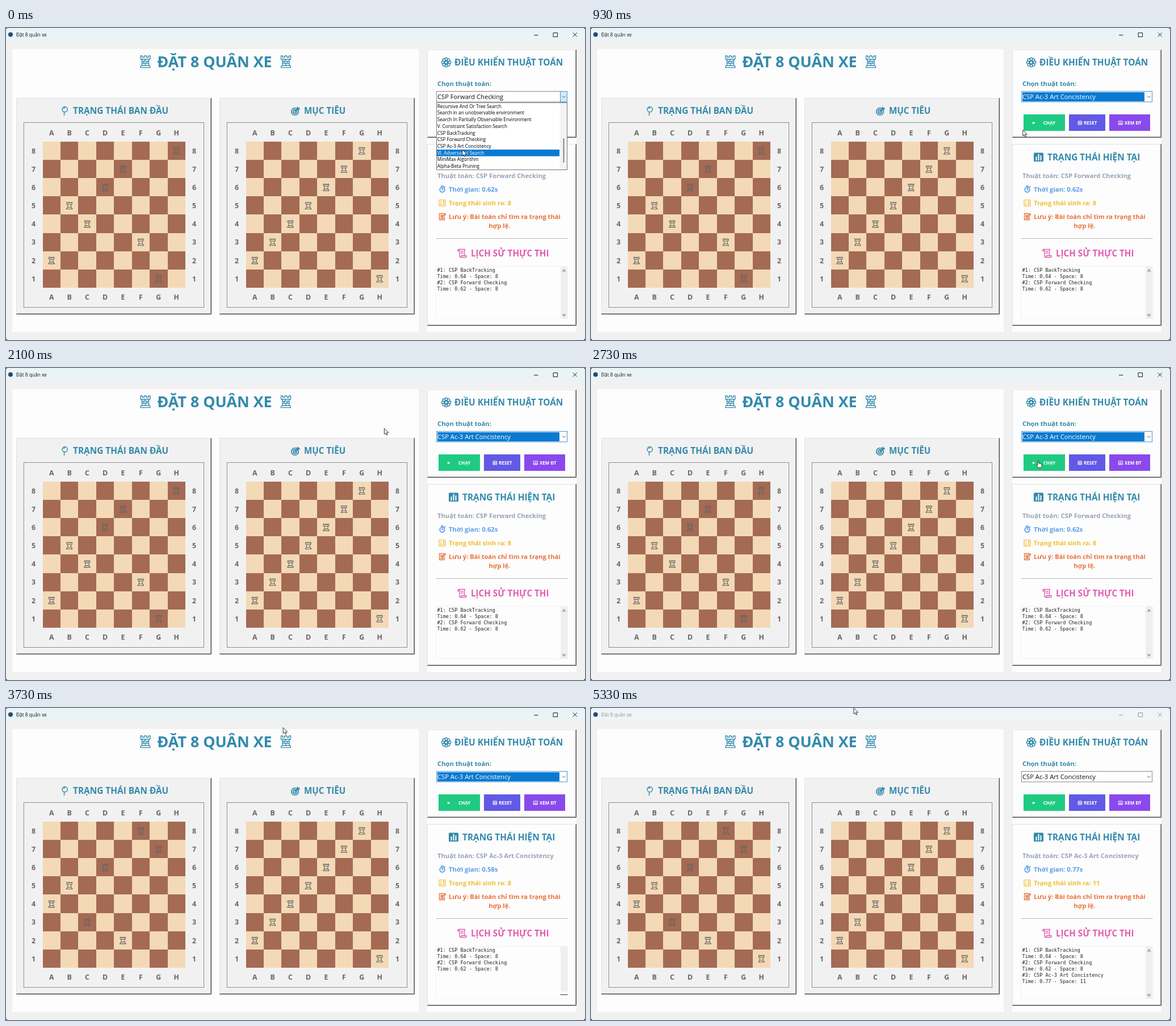
Recreate the animation shown at these times as an HTML page. Size 1020x549 px, loop 5.36 s.

```html
<!DOCTYPE html>
<html lang="vi">
<head>
<meta charset="utf-8">
<title>Đặt 8 quân xe</title>
<style>
html, body { margin: 0; height: 100%; overflow: hidden; background: #222; }
svg { display: block; width: 1020px; height: 549px; }
text { font-family: "Open Sans", "Noto Sans", sans-serif; white-space: pre; }
.b { font-weight: 700; }
.m { font-family: "DejaVu Sans Mono", monospace; }
.o { fill: none; stroke-linejoin: round; stroke-linecap: round; }
</style>
</head>
<body>
<svg id="stage" viewBox="0 0 1020 549"></svg>
<script>
const LOOP = 5360, CLOSE = 800, BLUR = 5050, RUN = 2975, STEP = 95;
const TEAL = '#338aac', BLUE = '#0a7ad1', DARK = '#a46a54', LIGHT = '#f3d9b6';
const CW = 31.43, CH = 32.14, TOP = 199.8;
const NAMES = 'ABCDEFGH';
const FIRST = 'H8 E7 D6 B5 C4 F3 A2 G1', GOAL = 'G8 F7 E6 D5 C4 B3 A2 H1';
const PLACED = 'B5 C3 D6 A4 E2 F8 G7 H1'.split(' ');
const OLD = 'CSP Forward Checking', NEW = 'CSP Ac-3 Art Concistency';
const ITEMS = ['Recursive And Or Tree Search', 'Search in an unobservable environment',
  'Search In Partially Observable Environment', 'V. Constraint Satisfaction Search', 'CSP BackTracking',
  OLD, NEW, 'VI. Adversarial Search', 'MiniMax Algorithm', 'Alpha-Beta Pruning'];
const LIST_Y = 131.8, ROW = 11.73;
// time, x, y of the pointer tip
const PATH = [[0, 804, 214.2], [530, 807, 205], [800, 807, 205], [1400, 429, -4], [1470, 429, -5],
  [1560, 431, -4], [2450, 788, 163], [2880, 788, 163], [3170, 649, 246], [3950, 450, -16],
  [4850, 463, -16], [5000, 463, 0], [LOOP, 463, 0]];

const rect = (x, y, x2, y2, fill, more = '') =>
  `<rect x="${x}" y="${y}" width="${x2 - x}" height="${y2 - y}" fill="${fill}" ${more}/>`;
const text = (x, y, size, fill, s, more = '') =>
  `<text x="${x}" y="${y}" font-size="${size}" fill="${fill}" ${more}>${s}</text>`;
const bold = (x, y, size, fill, s, more = '') => text(x, y, size, fill, s, 'class="b" ' + more);
const line = (d, stroke, w = 1, more = '') =>
  `<path class="o" d="${d}" stroke="${stroke}" stroke-width="${w}" ${more}/>`;
const icon = (x, y, color, d, w = 1.3) => line(d, color, w, `transform="translate(${x} ${y})"`);
const ring = (r, x = 0, y = 0) => `M${x - r} ${y}a${r} ${r} 0 1 0 ${2 * r} 0a${r} ${r} 0 1 0 ${-2 * r} 0`;
const group = id => `<g id="${id}"></g>`;
const MID = 'text-anchor="middle"';

const ROOK = 'M-4.8-5.5H-2.8V-4.3H-1V-5.5H1V-4.3H2.8V-5.5H4.8V-2.6L3-1.4V3L4.2 4.2V5.8H5.4V6.2H-5.4V5.8H-4.2V4.2L-3 3V-1.4L-4.8-2.6ZM-3.4-1.6H3.4M-3.4 3.2H3.4';
const TOWER = 'M-8.5-10.5H-5.5V-8H-2V-10.5H2V-8H5.5V-10.5H8.5V-5L6-3V6L8.5 8V10.2H-8.5V8L-6 6V-3L-8.5-5ZM-7.5-4.5H7.5M-6-1H6M-6 2.5H6M-7 6.5H7M-1-4.5V-1M-3-1V2.5M2.5-1V2.5M0 2.5V6.5';

function rooks(list, dx) {
  return list.map(p => {
    const x = 64.5 + dx + (NAMES.indexOf(p[0]) + .5) * CW, y = TOP + (8.5 - p[1]) * CH;
    return icon(x, y, '#656463', ROOK, 1.1);
  }).join('');
}

function raised(x, y, x2, y2, fill) {
  return rect(x, y, x2, y2, fill) + line(`M${x + .5} ${y2}V${y + .5}H${x2}`, '#e0e1e8') +
    line(`M${x + 1.5} ${y2 - 1.5}H${x2 - 1.5}V${y + 1.5}`, '#a5a5a5') +
    line(`M${x + .5} ${y2 - .5}H${x2 - .5}V${y + .5}`, '#484848');
}

function board(dx) {
  let s = raised(18 + dx, 123, 362 + dx, 504, '#f1f1f1');
  s += rect(32.5 + dx, 167.5, 347.5 + dx, 490.5, 'none', 'stroke="#fff"');
  s += rect(31.5 + dx, 166.5, 348.5 + dx, 491.5, 'none', 'stroke="#858585"');
  for (let r = 0; r < 8; r++) {
    for (let c = 0; c < 8; c++) {
      const x = Math.round(64.5 + dx + c * CW), y = Math.round(TOP + r * CH);
      s += rect(x, y, Math.round(64.5 + dx + (c + 1) * CW), Math.round(TOP + (r + 1) * CH), (r + c) % 2 ? DARK : LIGHT);
    }
    for (const y of [188.8, 478.4])
      s += bold(64.5 + dx + (r + .5) * CW, y, 12.4, '#666', NAMES[r], MID);
    for (const x of [48.5, 331.5])
      s += bold(x + dx, TOP + (r + .5) * CH + 4.8, 12.4, '#666', 8 - r, MID);
  }
  return s;
}

function button(x, x2, fill, tx, label) {
  return rect(x, 152, x2, 181, fill) + bold(tx, 169.9, 8, '#fff', label);
}

function petals() {
  let d = ring(2.6);
  for (let i = 0; i < 8; i++) {
    const a = i * Math.PI / 4;
    d += ring(2.3, 5.8 * Math.cos(a), 5.8 * Math.sin(a));
  }
  return d;
}

const stage = document.getElementById('stage');
stage.innerHTML =
  rect(0, 0, 1020, 549, '#f1f1f1', 'rx="4"') + group('bar') +
  rect(11, 37, 727, 535, '#fdfdfd') + rect(742, 37, 1005, 535, '#fdfdfd') +
  icon(245.5, 59.5, TEAL, TOWER, 1.3) + icon(493, 59.5, TEAL, TOWER, 1.3) +
  bold(266.5, 69, 26.8, TEAL, 'ĐẶT 8 QUÂN XE') +
  board(0) + board(358) + group('left') + rooks(GOAL.split(' '), 358) +
  icon(103, 146, TEAL, ring(4.6, .7, -2.8) + 'M-.5 2V7.5M-1.5-4.5Q-.5-6 1-5.8', 1.5) +
  bold(118, 151.3, 15.4, TEAL, 'TRẠNG THÁI BAN ĐẦU') +
  icon(509, 147, TEAL, ring(6.2) + ring(3) + 'M0 0L7-6.5M4.5-4.5V-7.5M4.5-4.5H8', 1.8) +
  bold(525, 151.3, 15.2, TEAL, 'MỤC TIÊU') +
  raised(742, 38, 1005, 193, '#fdfdfd') +
  icon(775.5, 60.5, TEAL, petals(), 1.5) +
  bold(790, 66, 15.4, TEAL, 'ĐIỀU KHIỂN THUẬT TOÁN') +
  bold(760, 101.8, 11.2, TEAL, 'Chọn thuật toán:') +
  button(762, 835, '#1fca82', 797, 'CHẠY') + '<path d="M778 164.7l5 2.3-5 2.3z" fill="#fff"/>' +
  button(842, 906, '#6259e6', 868, 'RESET') +
  icon(861.5, 167, '#fff', 'M-3-3H3V3H-3ZM-1.5-1H1.5V1.2H-1.5Z', 1) +
  button(913, 985, '#8a49ec', 940, 'XEM ĐT') +
  icon(933, 167, '#fff', 'M-3.3-3H3.3V3H-3.3ZM-1.8 2V0M0 2V-1M1.8 2V.5', 1) +
  raised(742, 204, 1005, 524, '#fdfdfd') +
  rect(780, 219.5, 797, 235, TEAL, 'rx="1.5"') +
  line('M784.5 232.5V227M788.5 232.5V222.5M792.5 232.5V225', '#fff', 2) +
  bold(804, 232.7, 15.4, TEAL, 'TRẠNG THÁI HIỆN TẠI') +
  group('stats') +
  icon(768.5, 284.5, '#589de8', ring(4.3) + 'M0 0V-2.4M-1.6-6.3H1.6M3.8-4.3L4.8-5.3M0 0H1.4', 1.7) +
  icon(768.5, 308, '#edbf35', 'M-5.5-5.5H5.5V5.5H-5.5ZM-2.5-3.4V-1M1.6-3.4H3V-2.2H1.8V-1H3.2M-3.2 1.2H-1.8V3.6H-3.2M1.8 1.2V2.4H3.2M3 1.2V3.6', 1.2) +
  icon(768.5, 332, '#e8713c', 'M3-5.5H-5V5.5H4V1M-3-2.5H0M-3 0H-1M-3 3H2M-.5 1.5L0-.8 5-5.3 6.2-4 1.3.8Z', 1.3) +
  bold(780, 335.8, 11.1, '#e8713c', 'Lưu ý: Bài toán chỉ tìm ra trạng thái') +
  bold(869.5, 351.5, 11.1, '#e8713c', 'hợp lệ.', MID) +
  line('M758 370.5H989', '#b4b4b4') +
  icon(803.5, 396.5, '#e45cb0', 'M-5.5-7H5Q3.8-6 4-4V4M-5.5-7Q-8-7-7.5-4H-4.5V4.5Q-4.5 7-2 7H5.5Q8 7 7.5 4H-1.5Q-1 7-2.5 7M-5.5-7Q-4.2-6-4.5-4M-2-3.5H1.5M-2-.5H1.5', 1.4) +
  bold(819, 401.7, 15.2, '#e45cb0', 'LỊCH SỬ THỰC THI') +
  rect(757.5, 419.5, 989.5, 511.5, '#fdfdfd', 'stroke="#e6e6e6" stroke-dasharray="1 1"') +
  group('log') + group('combo') + group('pointer');

const put = (id, html) => {
  const el = document.getElementById(id);
  if (el.last !== html) el.innerHTML = el.last = html;
};

function pointerAt(t) {
  const i = Math.max(1, PATH.findIndex(p => p[0] > t));
  const [t0, x0, y0] = PATH[i - 1], [t1, x1, y1] = PATH[i];
  const u = (t - t0) / (t1 - t0), k = u * u * (3 - 2 * u);
  return [x0 + (x1 - x0) * k, y0 + (y1 - y0) * k];
}

function drawBar(active) {
  const ink = active ? '#1a1a1a' : '#929697';
  put('bar', `<path d="M0 23V4Q0 0 4 0H1016Q1020 0 1020 4V23Z" fill="${active ? '#eaf4f6' : '#eff4f6'}"/>` +
    '<circle cx="8" cy="11.5" r="4" fill="#234a78"/>' +
    text(18, 14.8, 8.35, ink, 'Đặt 8 quân xe') +
    line('M930.5 12.5H937M964.5 8.5H971.5V15.5H964.5ZM999 8.5L1005.5 15M1005.5 8.5L999 15', ink));
}

function drawCombo(t, y) {
  const open = t < CLOSE, focus = !open && t < BLUR;
  let s = rect(758.5, 111.5, 988.5, 130, '#fff', `stroke="${focus ? '#3f93d6' : '#888'}"`);
  if (focus) s += rect(760, 113, 975, 129, BLUE);
  if (open) s += rect(976.5, 111.5, 988.5, 130, '#d3e9f8', 'stroke="#4595cf"');
  s += text(760, 125.2, 11.2, focus ? '#fff' : '#111', open ? OLD : NEW) +
    line('M980 119.7L982.7 122.4 985.4 119.7', '#555');
  if (open) {
    const hot = Math.floor((y - LIST_Y) / ROW);
    s += rect(758.5, 131.5, 988.5, 249.5, '#fff', 'stroke="#777"') + rect(975.5, 132, 988, 249, '#f3f3f3') +
      rect(981.5, 194, 983.5, 237, '#858585', 'rx="1"') +
      rect(759, LIST_Y + hot * ROW, 975, LIST_Y + (hot + 1) * ROW, BLUE);
    ITEMS.forEach((name, i) => s += text(759.7, 140.6 + i * ROW, 8.25, i === hot ? '#fff' : '#000', name));
  }
  put('combo', s);
}

function drawStats(n) {
  const secs = n ? ((RUN + n * STEP - 3060) / 1000).toFixed(2) : '0.62';
  const count = n ? Math.max(0, Math.round((n - 2) * 11 / 7)) : 8;
  put('stats', bold(760, 263.5, 11.2, '#98a3b5', 'Thuật toán: ' + (n ? NEW : OLD)) +
    bold(780, 287.8, 11.3, '#589de8', `Thời gian: ${secs}s`) +
    bold(780, 311.8, 11.2, '#edbf35', 'Trạng thái sinh ra: ' + count));
}

function drawLog(n) {
  const rows = ['#1: CSP BackTracking', 'Time: 0.64 - Space: 8', '#2: ' + OLD, 'Time: 0.62 - Space: 8'];
  if (n > 8) rows.push('#3: ' + NEW, 'Time: 0.77 - Space: 11');
  const busy = n > 0 && n < 9;
  put('log', rows.map((s, i) => text(759.5, 429.2 + i * 10.9, 8.5, '#222', s, 'class="m"')).join('') +
    rect(977, 420, 989, busy ? 499 : 511, '#efefef') +
    (busy ? line('M977 504.5H989', '#333') :
      '<path d="M979.5 428.5h7l-3.5-5zM979.5 503.5h7l-3.5 5z" fill="#a6a6a6"/>'));
}

function drawPointer(t, x, y) {
  const hand = t > CLOSE && y > 152 && y < 181 &&
    [[762, 835], [842, 906], [913, 985]].some(([a, b]) => x > a && x < b);
  const d = hand ? 'M-1 .8Q0-.5 1 .8V5Q2 4 3 5.2 4 4.6 4.8 5.8 6 5.4 6.2 7V9Q6 11 5 12.5H-.5Q-1.5 10.5-3.5 8-3.2 6.2-1 8Z' :
    'M0 0V10.5L2.4 8.3 4 12 5.7 11.3 4.1 7.7H7.5Z';
  put('pointer', `<path d="${d}" fill="#fff" stroke="#222" stroke-width=".9" stroke-linejoin="round" transform="translate(${x} ${y})"/>`);
}

function frame(now) {
  const t = now % LOOP, [x, y] = pointerAt(t);
  const n = Math.max(0, Math.min(9, Math.floor((t - RUN) / STEP)));
  drawBar(t < BLUR);
  put('left', rooks(n ? PLACED.slice(0, n) : FIRST.split(' '), 0));
  drawStats(n);
  drawLog(n);
  drawCombo(t, y);
  drawPointer(t, x, y);
  requestAnimationFrame(frame);
}
frame(performance.now());
</script>
</body>
</html>
```
